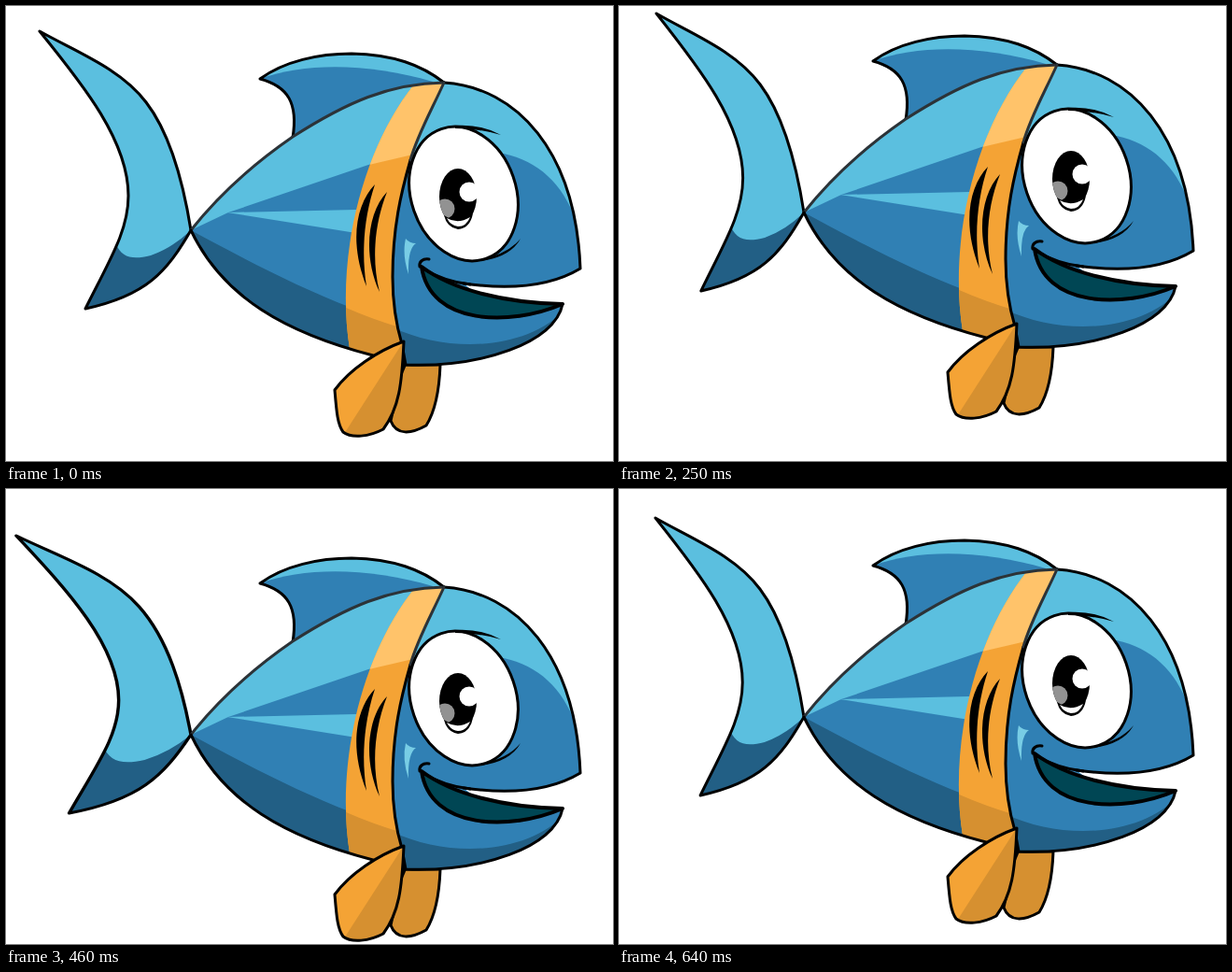
Recreate the animation shown at these times as an HTML page. Size 650 by 487 pixels, loop 0.67 s.

```html
<!DOCTYPE html>
<html lang="en">
<head>
<meta charset="utf-8">
<title>Swimming fish</title>
<style>
  html, body { margin: 0; width: 100%; height: 100%; overflow: hidden; background: #fff; }
  svg { display: block; width: 100%; height: 100%; }
  .line { fill: none; stroke: #000; stroke-width: 3; stroke-linejoin: round; stroke-linecap: round; }
  .soft { stroke: #2c3338; }
  .light { fill: #5bbfdf; }
  .mid { fill: #3080b4; }
  .dark { fill: #225f85; }
  .orange { fill: #f4a335; }
  .peach { fill: #ffc36a; }
  .ochre { fill: #d69030; }
  .mouth { fill: #004654; stroke-width: 4; }
</style>
</head>
<body>
<svg viewBox="0 0 650 487">
  <defs>
    <path id="tailShape" d="M36 27C75 49 123 67 150 103C177 138 190 190 198 240C172 285 150 310 85 324C112 270 131 240 131 203C131 145 84 86 36 27Z"/>
    <path id="dorsalShape" d="M272 78C298 59 335 51 370 51C415 52 445 63 469 82L307 141C313 104 302 86 272 78Z"/>
    <path id="trunkShape" d="M198 240C228 202 262 171 307 140C365 103 410 83 469 82C444 132 414 200 414 290C414 320 418 342 424 362L393 374C300 350 232 312 198 240Z"/>
    <path id="headShape" d="M469 82C547 87 610 155 615 281C580 302 532 303 490 297L500 305C530 314 565 318 596 319C588 361 508 387 428 384L424 362C418 342 414 320 414 290C414 200 444 132 469 82Z"/>
    <path id="bandShape" d="M437 84C384 150 352 265 368 367L393 374L424 362C418 342 414 320 414 290C414 200 444 132 469 82Q450 82 437 84Z"/>
    <path id="frontFinShape" d="M426 359C398 369 368 389 352 411C354 435 355 448 361 456C370 463 389 461 404 453C421 430 424 405 426 359Z"/>
    <path id="backFinShape" d="M425 384H465C464 412 460 433 450 449C434 458 418 460 412 444Z"/>
    <ellipse id="pupilShape" cx="484" cy="204" rx="20" ry="30"/>
    <clipPath id="tailClip"><use href="#tailShape"/></clipPath>
    <clipPath id="dorsalClip"><use href="#dorsalShape"/></clipPath>
    <clipPath id="trunkClip"><use href="#trunkShape"/></clipPath>
    <clipPath id="headClip"><use href="#headShape"/></clipPath>
    <clipPath id="bandClip"><use href="#bandShape"/></clipPath>
    <clipPath id="finClip"><use href="#frontFinShape"/></clipPath>
    <clipPath id="pupilClip"><use href="#pupilShape"/></clipPath>
  </defs>

  <g id="fish">
    <g id="tail">
      <use href="#tailShape" class="light"/>
      <path class="dark" clip-path="url(#tailClip)" d="M116 250C122 270 135 272 155 267Q178 259 198 240V330H70V250Z"/>
      <use href="#tailShape" class="line"/>
    </g>

    <use href="#dorsalShape" class="light"/>
    <path class="mid" clip-path="url(#dorsalClip)" d="M272 78C320 60 390 61 457 81L460 150H270Z"/>
    <use href="#dorsalShape" class="line"/>

    <use href="#backFinShape" class="ochre"/>
    <use href="#backFinShape" class="line"/>

    <use href="#trunkShape" class="mid"/>
    <g clip-path="url(#trunkClip)">
      <path class="light" d="M198 240L238 221L388 170L480 140V60H198Z"/>
      <path class="light" d="M237 221L375 218V243Z"/>
      <path class="dark" d="M198 240C250 268 310 300 370 323V390H198Z"/>
    </g>
    <use href="#bandShape" class="orange"/>
    <g clip-path="url(#bandClip)">
      <path class="peach" d="M380 172L440 158L480 70H380Z"/>
      <path class="ochre" d="M355 319Q390 335 425 345V380H355Z"/>
    </g>
    <path class="line soft" d="M198 240C228 202 262 171 307 140C365 103 410 83 469 82"/>
    <path class="line" d="M198 240C232 312 300 350 393 374"/>

    <use href="#headShape" class="mid"/>
    <g clip-path="url(#headClip)">
      <path class="light" d="M420 160L533 158C570 166 596 190 610 229L630 70H430Z"/>
      <path class="dark" d="M410 342C470 372 556 370 600 324V400H410Z"/>
    </g>
    <path class="line" d="M469 82C547 87 610 155 615 281C580 302 532 303 490 297M596 319C588 361 508 387 428 384L424 362C418 342 414 320 414 290C414 237 423 200 433 165"/>
    <path class="line soft" d="M433 165C440 139 456 111 469 82"/>

    <path class="line mouth" d="M445 279C478 304 535 318 596 319C540 343 454 342 445 279Z"/>
    <path class="line" d="M446 281C463 291 478 296 497 298M443 279C442 274 446 270 453 271"/>
    <path d="M428 249Q432 254 439 254Q430 260 431 287Q424 266 428 249Z" fill="#78cde5"/>

    <path d="M395 191C375 212 367 252 386 300C380 262 384 224 395 191ZM408 199C387 221 382 267 400 306C391 270 395 232 408 199Z"/>

    <ellipse cx="490" cy="201" rx="56.2" ry="73.4" transform="rotate(-19 490 201)" fill="#fff" stroke="#000" stroke-width="3"/>
    <path d="M481 128Q508 126 530 138Q506 131 481 131ZM508 271Q537 266 551 249Q540 269 508 273Z"/>
    <use href="#pupilShape"/>
    <g clip-path="url(#pupilClip)">
      <circle cx="470" cy="217" r="10.5" fill="#929292"/>
    </g>
    <circle cx="496" cy="199" r="10.5" fill="#fff"/>
    <path d="M469 224Q484 234 500 222Q497 238 484 239Q472 237 469 224Z"/>
    <path d="M472 227Q484 234 497 226Q493 236 484 236Q476 235 472 227Z" fill="#fff"/>

    <path d="M422 366L429 384L423 398Z"/>
    <use href="#frontFinShape" class="orange"/>
    <path class="ochre" clip-path="url(#finClip)" d="M427 357L362 458L380 470H440Z"/>
    <use href="#frontFinShape" class="line"/>
  </g>
</svg>
<script>
  const LOOP = 670, FIRST_HOLD = 100, STEP = 30;
  const TAIL_ROOT = 198, TAIL_LENGTH = 162;
  const fish = document.getElementById('fish');
  const tail = document.getElementById('tail');

  // [step, value] pairs: vertical drift and tail tip position
  const drift = [[0, 0], [4, -24], [5, -25], [13, 23], [14, 24], [20, 0]];
  const tailTip = [[0, 36], [3, 58], [6, 40], [9, 25], [13, 11], [17, 39], [19, 39]];

  function valueAt(keys, step) {
    const next = keys.findIndex(([at]) => at >= step);
    if (next === 0) return keys[0][1];
    const [a, from] = keys[next - 1], [b, to] = keys[next];
    return from + (to - from) * (step - a) / (b - a);
  }

  function draw(time) {
    const t = time % LOOP;
    const step = t < FIRST_HOLD ? 0 : 1 + Math.floor((t - FIRST_HOLD) / STEP);
    const stretch = (TAIL_ROOT - valueAt(tailTip, step)) / TAIL_LENGTH;
    fish.setAttribute('transform', `translate(0 ${Math.round(valueAt(drift, step))})`);
    tail.setAttribute('transform', `translate(${TAIL_ROOT} 0) scale(${stretch} 1) translate(${-TAIL_ROOT} 0)`);
  }

  const start = performance.now();
  function tick() {
    draw(performance.now() - start);
    requestAnimationFrame(tick);
  }
  tick();
</script>
</body>
</html>
```
